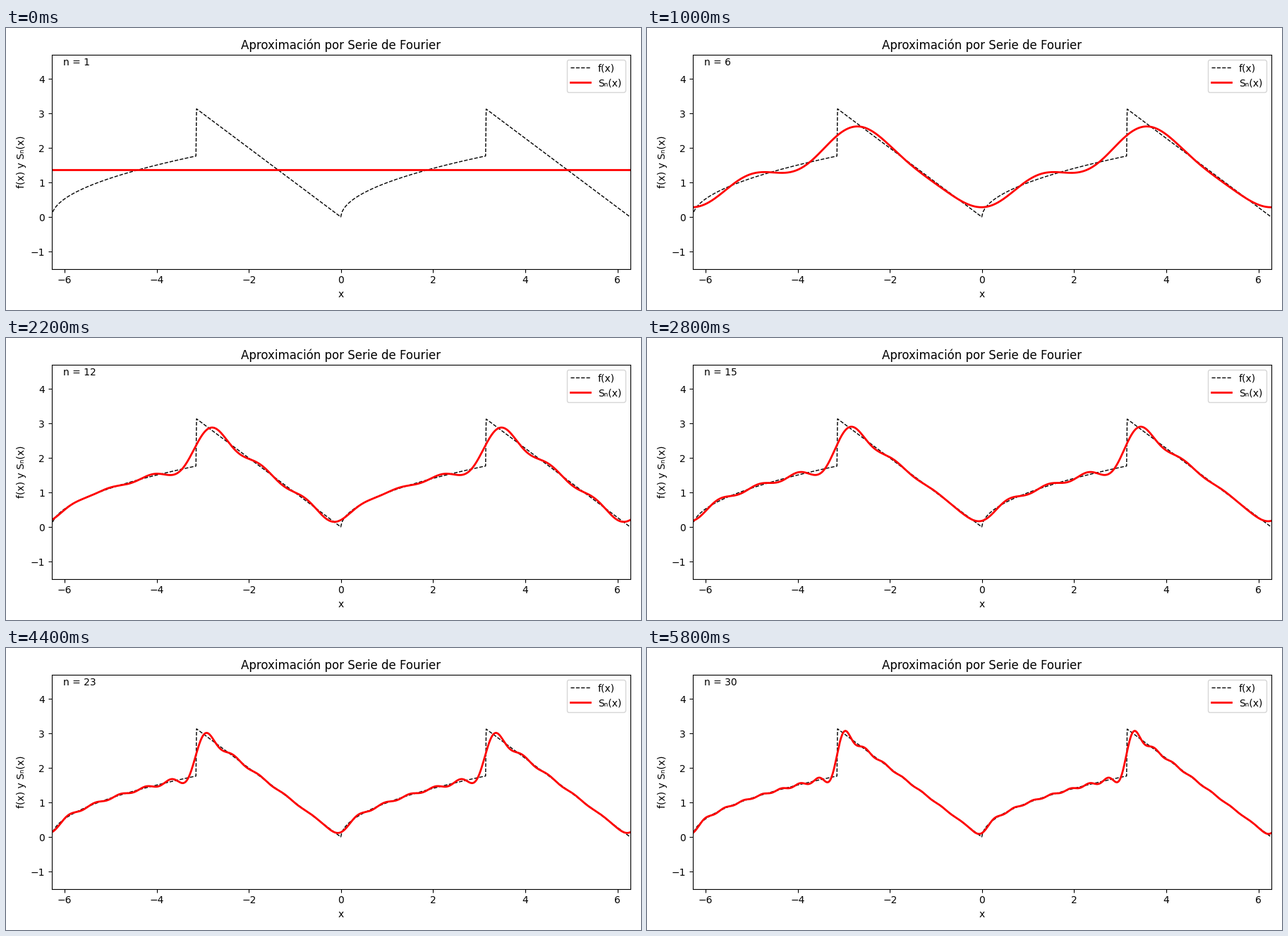
A matplotlib script that plays this animation: 900 px wide and 400 px high, repeating every 6000 ms.

```python
import numpy as np
import matplotlib.pyplot as plt
from matplotlib.animation import FuncAnimation

TERMS = 30
PERIOD = 2 * np.pi


def f(x):
    """Periodic: square root on the first half, falling ramp on the second."""
    t = np.mod(x, PERIOD)
    return np.where(t < np.pi, np.sqrt(t), PERIOD - t)


# Midpoint samples over one period for the coefficient integrals
SAMPLES = 20000
u = (np.arange(SAMPLES) + 0.5) * PERIOD / SAMPLES
fu = f(u)


def harmonic(k, x):
    a = 2 * np.mean(fu * np.cos(k * u))
    b = 2 * np.mean(fu * np.sin(k * u))
    return a * np.cos(k * x) + b * np.sin(k * x)


x = np.linspace(-PERIOD, PERIOD, 1000)
y = f(x)

# Partial sums; on the doubled interval only even terms contribute
sums = [np.full_like(x, fu.mean())]
for k in range(1, TERMS // 2 + 1):
    sums.append(sums[-1] + harmonic(k, x))

fig, ax = plt.subplots(figsize=(9, 4), dpi=100)
ax.plot(x, y, "k--", lw=1, label="f(x)")
approx, = ax.plot(x, sums[0], "r", lw=2, label="Sₙ(x)")
counter = ax.text(0.02, 0.95, "n = 1", transform=ax.transAxes)

ax.set_xlim(-PERIOD, PERIOD)
ax.set_ylim(-1.5, 1.5 * y.max())
ax.set_title("Aproximación por Serie de Fourier")
ax.set_xlabel("x")
ax.set_ylabel("f(x) y Sₙ(x)")
ax.legend(loc="upper right")
fig.tight_layout()


def update(i):
    n = i + 1
    approx.set_ydata(sums[n // 2])
    counter.set_text(f"n = {n}")
    return approx, counter


anim = FuncAnimation(fig, update, frames=TERMS, interval=200,
                     repeat=True, repeat_delay=0)
plt.show()
```
